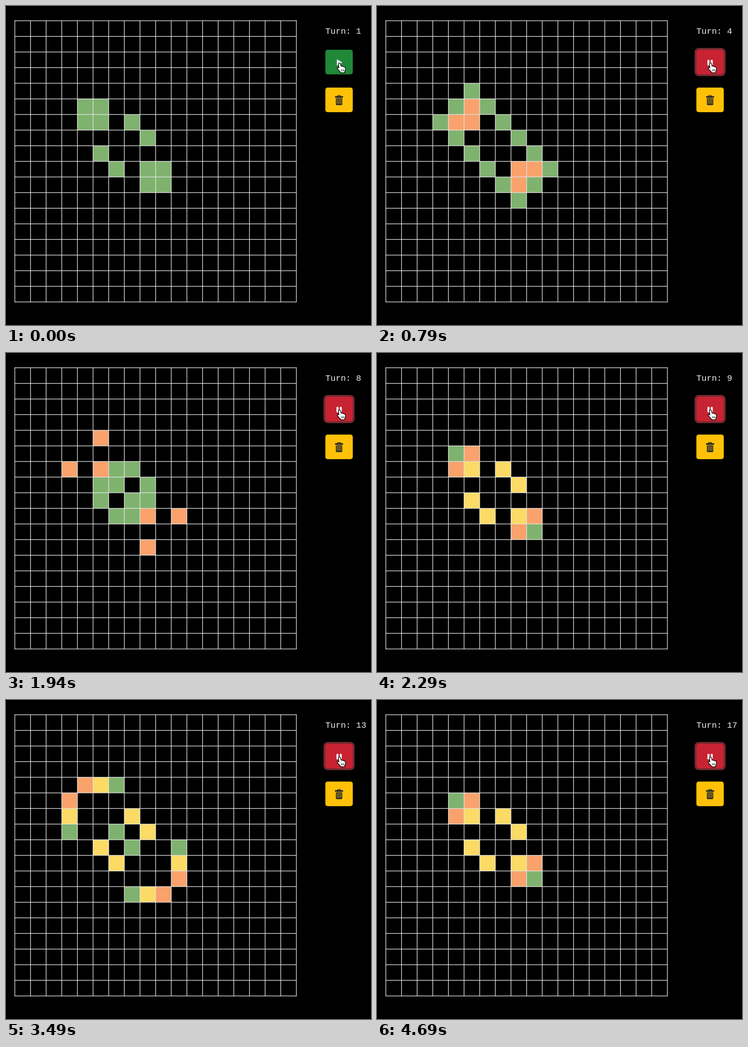
Write an HTML page with a canvas that moves like this. It is 800 by 700 pixels and loops after 5090 ms.

```html
<!DOCTYPE html>
<html lang="en">
<head>
<meta charset="utf-8">
<title>Game of Life</title>
<style>
  html, body { margin: 0; height: 100%; overflow: hidden; background: #000; }
  canvas { display: block; }
</style>
</head>
<body>
<canvas width="800" height="700"></canvas>
<script>
const ctx = document.querySelector('canvas').getContext('2d');
const LOOP = 5090, SIZE = 18, PITCH = 34.28, LEFT = 19.4, TOP = 32.4;
const PRESS = 40, CLICK = 190, FRAME = 50;
const GREEN = '#80b26f', YELLOW = '#fbdb65', ORANGE = '#f9a26c', RED = '#f0433a';
const TINTS = [GREEN, YELLOW, ORANGE, RED];
const TURN_TIMES = [CLICK, 490, 790, 1040, 1390, 1690, 1940, 2290, 2540,
  2840, 3190, 3490, 3790, 4090, 4390, 4690];
const SEED = [[4, 5], [5, 5], [4, 6], [5, 6], [7, 6], [8, 7],
  [5, 8], [6, 9], [8, 9], [9, 9], [8, 10], [9, 10]];

const hand = new Path2D('M731 125q2 0 2.4 2l.9 5q2.3-1 3.2.8q2.3-.8 3.2 1q2.6-.4 3 1.6' +
  'q.9 3.6-.2 6l-1 2.5v2.6h-9.6v-1.8l-5.2-5.4q-2.6-3-1.6-4.4q1.4-1 3.6 1.2l-1.2-8.6' +
  'Q729 125 731 125z');
const knuckles = new Path2D('M735.3 139v4M737.9 139v4M740.5 139v4');
const play = new Path2D('M726 118.3l9.6 5.7l-9.6 5.7z');

// Survivors take the tint of the turn; a reborn cell keeps the last tint it had.
function simulate() {
  const tint = Array(SIZE * SIZE).fill(GREEN);
  let alive = Array(SIZE * SIZE).fill(false);
  for (const [x, y] of SEED) alive[y * SIZE + x] = true;
  const snapshot = () => tint.map((c, i) => alive[i] ? c : null);
  const turns = [snapshot()];
  for (let turn = 2; turn <= TURN_TIMES.length + 1; turn++) {
    const next = alive.map((on, i) => {
      const x = i % SIZE, y = (i - x) / SIZE;
      let n = on ? -1 : 0;
      for (let v = Math.max(0, y - 1); v <= Math.min(SIZE - 1, y + 1); v++)
        for (let u = Math.max(0, x - 1); u <= Math.min(SIZE - 1, x + 1); u++)
          n += alive[v * SIZE + u];
      return n === 3 || (on && n === 2);
    });
    next.forEach((on, i) => { if (on && alive[i]) tint[i] = TINTS[turn % 4]; });
    alive = next;
    turns.push(snapshot());
  }
  return turns;
}
const turns = simulate();

function box(x, y, w, h, r, fill) {
  ctx.fillStyle = fill;
  ctx.beginPath();
  ctx.roundRect(x, y, w, h, r);
  ctx.fill();
}

function drawGrid(cells) {
  cells.forEach((color, i) => {
    if (!color) return;
    ctx.fillStyle = color;
    ctx.fillRect(LEFT + i % SIZE * PITCH, TOP + Math.floor(i / SIZE) * PITCH, PITCH, PITCH);
  });
  const span = SIZE * PITCH, half = 0.7;
  ctx.fillStyle = '#e4e4e4';
  for (let i = 0; i <= SIZE; i++) {
    ctx.fillRect(LEFT + i * PITCH - half, TOP - half, 2 * half, span + 2 * half);
    ctx.fillRect(LEFT - half, TOP + i * PITCH - half, span + 2 * half, 2 * half);
  }
}

const STATES = {
  idle:    { fill: [33, 136, 56], ring: [72, 180, 97, 0], spread: 0 },
  pressed: { fill: [30, 126, 52], ring: [72, 180, 97, 0.5], spread: 4 },
  running: { fill: [200, 35, 51], ring: [225, 83, 97, 0.5], spread: 4 }
};

// Transitions last 150 ms and advance in 50 ms steps.
function ease(t, start) {
  const p = Math.min(1, Math.max(0, (Math.floor((t - start) / FRAME) + 1) / 3));
  return p * p * (3 - 2 * p);
}

function drawToggle(t) {
  const running = t >= CLICK;
  const from = running ? STATES.pressed : STATES.idle;
  const to = running ? STATES.running : STATES.pressed;
  const p = ease(t, running ? CLICK : PRESS);
  const mix = (a, b) => a + (b - a) * p;
  const color = key => `rgba(${from[key].map((a, i) => mix(a, to[key][i]))})`;
  const s = mix(from.spread, to.spread);
  if (s) {
    box(700 - s, 96 - s, 60 + 2 * s, 54 + 2 * s, 5 + s, color('ring'));
    box(700, 96, 60, 54, 5, '#000');
  }
  box(700, 96, 60, 54, 5, color('fill'));
  if (running) {
    box(724.3, 118, 4.4, 12.5, 2, '#fff');
    box(731.5, 118, 4.4, 12.5, 2, '#fff');
  } else {
    ctx.fillStyle = ctx.strokeStyle = '#fff';
    ctx.lineWidth = 1.5;
    ctx.fill(play);
    ctx.stroke(play);
  }
}

function drawTrash() {
  const dark = '#212529', yellow = '#ffc107';
  box(700, 179, 60, 54, 5, yellow);
  box(726, 195.8, 8, 4, 1.5, dark);
  box(728, 197.2, 4, 1.2, 0, yellow);
  box(721, 198, 18, 3.2, 1, dark);
  box(723, 202, 14, 15.5, 2, dark);
  for (let i = 0; i < 4; i++) box(725.1 + i * 2.95, 202, 0.95, 13, 0.4, yellow);
}

function drawHand() {
  ctx.fillStyle = '#fff';
  ctx.strokeStyle = '#000';
  ctx.lineJoin = 'round';
  ctx.lineWidth = 1.4;
  ctx.fill(hand);
  ctx.stroke(hand);
  ctx.lineWidth = 1;
  ctx.stroke(knuckles);
}

function draw(t) {
  const turn = TURN_TIMES.filter(at => t >= at).length + 1;
  ctx.fillStyle = '#000';
  ctx.fillRect(0, 0, 800, 700);
  drawGrid(turns[turn - 1]);
  ctx.fillStyle = '#eee';
  ctx.font = '18.7px "Liberation Mono", monospace';
  ctx.fillText('Turn: ' + turn, 700, 60.5);
  drawToggle(t);
  drawTrash();
  drawHand();
}

const start = performance.now();
function tick() {
  draw((performance.now() - start) % LOOP);
  requestAnimationFrame(tick);
}
tick();
</script>
</body>
</html>
```
